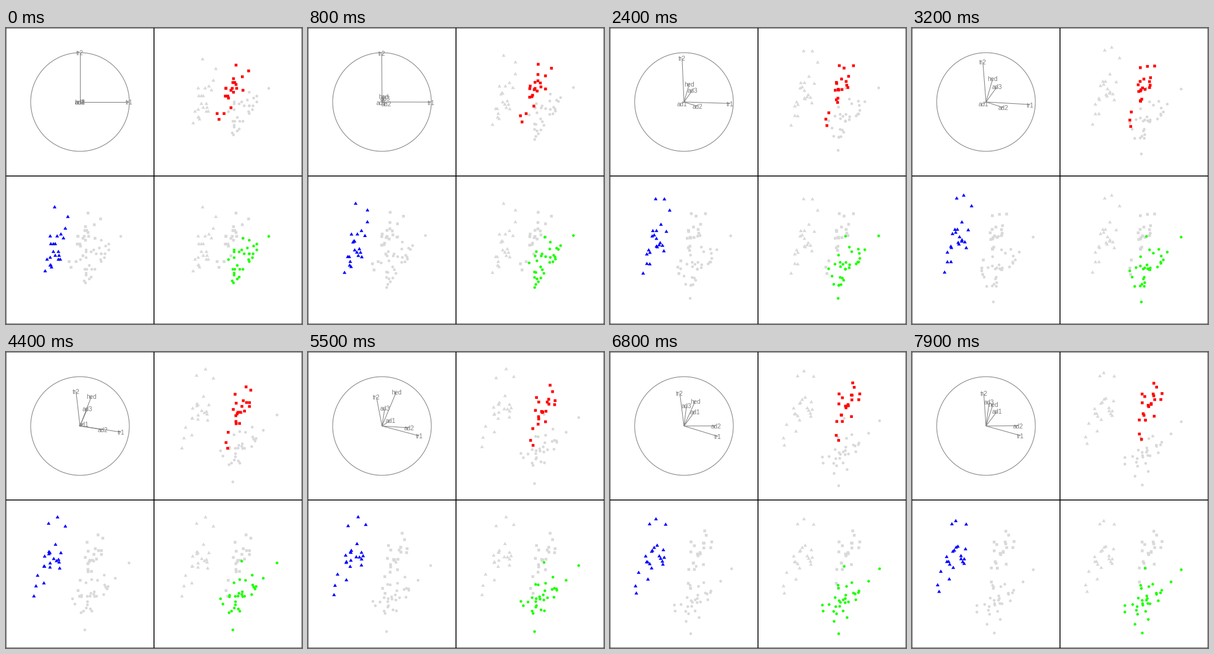
Animation, 480 px wide and 480 px high, one loop 8 s. Source, as a matplotlib script:

```python
import numpy as np
import matplotlib.pyplot as plt
from matplotlib.animation import FuncAnimation
from matplotlib.collections import LineCollection, PolyCollection
from matplotlib.patches import Circle, Rectangle

SIZE, DPI, FRAMES, STEP = 480, 100, 80, 100
PX = 72 / DPI          # points per pixel
RADIUS = 80            # axis circle
SPREAD = 122.6         # pixels per full range of a variable
GREY, PALE = "#7f7f7f", "#d9d9d9"

# One column per measured variable: 21 + 22 + 31 beetles of three species
tr1 = [191, 185, 200, 173, 171, 160, 188, 186, 174, 163, 190, 174, 201, 190,
       182, 184, 177, 178, 210, 182, 186,
       158, 146, 151, 122, 138, 132, 131, 135, 125, 130, 130, 138, 130, 143,
       154, 147, 141, 131, 144, 137, 143, 135,
       186, 211, 201, 242, 184, 211, 217, 223, 208, 199, 211, 218, 203, 192,
       195, 211, 187, 192, 223, 188, 216, 185, 178, 187, 187, 201, 187, 210,
       196, 195, 187]
tr2 = [131, 134, 137, 127, 118, 118, 134, 129, 131, 115, 143, 131, 130, 133,
       130, 131, 127, 126, 140, 121, 136,
       141, 119, 130, 113, 121, 115, 127, 123, 119, 120, 131, 127, 116, 123,
       135, 132, 131, 116, 121, 146, 119, 127,
       107, 122, 114, 131, 108, 118, 122, 127, 125, 124, 129, 126, 122, 116,
       123, 122, 123, 109, 124, 114, 120, 114, 119, 111, 112, 130, 120, 119,
       114, 110, 124]
hed = [53, 50, 52, 50, 49, 47, 54, 51, 52, 47, 52, 50, 51, 53,
       51, 51, 49, 53, 54, 51, 56,
       58, 51, 51, 45, 53, 49, 51, 50, 51, 48, 51, 52, 52, 54,
       56, 54, 51, 47, 53, 53, 53, 52,
       49, 49, 47, 54, 43, 51, 49, 51, 50, 46, 49, 49, 49, 49,
       47, 48, 47, 46, 53, 48, 50, 46, 47, 49, 49, 54, 47, 50,
       51, 49, 49]
ad1 = [150, 147, 144, 144, 153, 140, 151, 143, 144, 142, 141, 150, 148, 154,
       147, 137, 134, 157, 149, 147, 148,
       145, 140, 140, 131, 139, 139, 136, 129, 140, 137, 141, 138, 143, 142,
       144, 138, 140, 130, 137, 137, 136, 140,
       120, 123, 130, 131, 116, 122, 127, 132, 125, 119, 122, 120, 119, 123,
       125, 125, 129, 130, 129, 122, 129, 124, 120, 119, 119, 133, 121, 128,
       129, 124, 129]
ad2 = [15, 13, 14, 16, 13, 15, 14, 14, 14, 15, 13, 15, 13, 15,
       14, 14, 15, 14, 13, 13, 14,
       8, 11, 11, 10, 11, 10, 12, 11, 10, 9, 11, 9, 9, 11,
       10, 10, 10, 9, 11, 10, 9, 10,
       14, 16, 14, 16, 16, 15, 15, 16, 14, 13, 13, 15, 14, 15,
       15, 14, 14, 13, 13, 12, 15, 15, 13, 16, 14, 13, 15, 14,
       14, 13, 14]
ad3 = [104, 105, 102, 97, 106, 99, 98, 110, 116, 95, 99, 105, 110, 106,
       105, 95, 105, 116, 107, 111, 111,
       107, 111, 113, 102, 106, 98, 107, 107, 110, 106, 108, 101, 111, 95,
       123, 102, 106, 102, 104, 113, 105, 108,
       84, 95, 74, 90, 75, 90, 73, 84, 88, 78, 83, 85, 73, 90,
       77, 73, 75, 90, 82, 74, 86, 92, 78, 66, 55, 84, 86, 68,
       86, 89, 88]

names = ["tr1", "tr2", "hed", "ad1", "ad2", "ad3"]
data = np.array([tr1, tr2, hed, ad1, ad2, ad3], float).T
data = (data - data.mean(0)) / np.ptp(data, axis=0)
groups = np.split(data, [21, 43])

# Tour stops: step number, then the x and y parts of each variable's axis
stops = [
    (0, [80, 0, 0, 0, 0, 0], [0, 80, 0, 0, 0, 0]),
    (32, [71, -5, 11, -4, 28, 18], [-4, 65, 38, -3, -9, 25]),
    (44, [66.5, -6.5, 18.5, 5.5, 37, 12], [-10, 56, 48, 3, -6, 28]),
    (55, [60, -9, 23, 13.5, 44, 4.5], [-16, 47, 55, 9, -3, 29]),
    (68, [55, -7, 18, 17.5, 51.5, 4], [-17, 53, 40, 23.5, 0, 33]),
    (79, [56, -4, 11, 18, 52, 5], [-16, 53, 35, 24, 0, 39]),
]


def orthonormal(m):
    u, _, vt = np.linalg.svd(m, full_matrices=False)
    return u @ vt


times = [s[0] for s in stops]
bases = [orthonormal(np.array(s[1:]).T) for s in stops]


def basis_at(i):
    k = min(np.searchsorted(times, i, side="right"), len(times) - 1)
    f = (i - times[k - 1]) / (times[k] - times[k - 1])
    return orthonormal((1 - f) * bases[k - 1] + f * bases[k])


# Glyph outlines in pixels, y pointing down
R = 2.25
angle = np.linspace(0, 2 * np.pi, 28, endpoint=False)
square = R * np.array([(-1, -1), (1, -1), (1, 1), (-1, 1)])
triangle = R * np.array([(0, -1.555), (1.347, 0.778), (-1.347, 0.778)])
disc = R * np.column_stack([np.cos(angle), np.sin(angle)])
glyphs = [square, triangle, disc]
colors = ["#ff0000", "#0000ff", "#20ff06"]
centers = [(360, 120), (120, 360), (360, 360)]

fig = plt.figure(figsize=(SIZE / DPI, SIZE / DPI), dpi=DPI, facecolor="white")
ax = fig.add_axes([0, 0, 1, 1])
ax.set_xlim(0, SIZE)
ax.set_ylim(SIZE, 0)
ax.axis("off")

HUB = np.array([120, 120])
ax.add_patch(Circle(HUB, RADIUS, fill=False, ec=GREY, lw=PX))
spokes = ax.add_collection(LineCollection([], colors=GREY, linewidths=PX))
labels = [ax.text(*HUB, n, color=GREY, family="Liberation Sans",
                  size=10 * PX, ha="center", va="baseline") for n in names]

clouds = []
for panel, center in enumerate(centers):
    for g in range(3):
        lit = g == panel
        cloud = PolyCollection([], facecolors=colors[g] if lit else PALE,
                               linewidths=0, zorder=3 if lit else 2)
        cloud.set_snap(False)
        ax.add_collection(cloud, autolim=False)
        clouds.append((cloud, g, np.array(center)))

for x in (0, 240):
    for y in (0, 240):
        ax.add_patch(Rectangle((x, y), 240, 240, fill=False, ec="black",
                               lw=PX, snap=False, zorder=4, clip_on=False))


def draw(i):
    basis = basis_at(i) * [1, -1]
    tips = HUB + RADIUS * basis
    spokes.set_segments([(HUB, tip) for tip in tips])
    for label, (x, y) in zip(labels, tips):
        label.set_position((x, y + 4.4))
    spots = [SPREAD * g @ basis for g in groups]
    for cloud, g, center in clouds:
        cloud.set_verts((center + spots[g])[:, None] + glyphs[g])
    return [spokes, *labels, *(c[0] for c in clouds)]


anim = FuncAnimation(fig, draw, frames=FRAMES, interval=STEP, repeat=True,
                     repeat_delay=0, blit=False)
plt.show()
```
